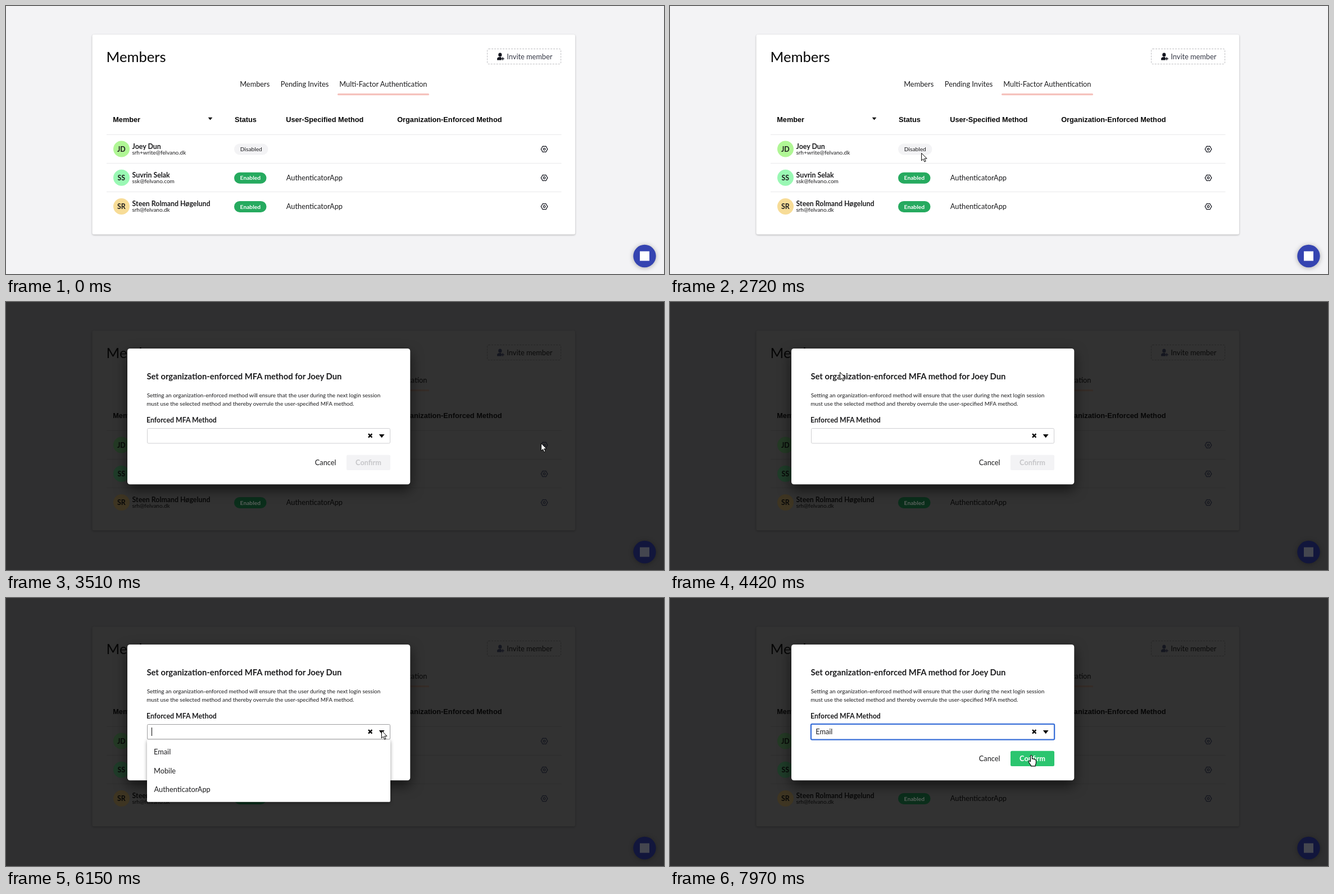
Write an HTML page that moves like this. It is 1171 by 478 pixels and loops after 8000 ms.

```html
<!DOCTYPE html>
<html lang="en">
<head>
<meta charset="utf-8">
<title>Members</title>
<style>
  html, body { margin: 0; width: 100%; height: 100%; overflow: hidden; }
  svg {
    display: block; width: 100%; height: 100%;
    font: 12.8px Lato, sans-serif; fill: #060606;
    --page: #f3f3f5; --card: #fff; --line: #e9e9eb; --dash: #bdbdc0;
    --tab: #f5c1bc; --pill: #26aa5f; --pillText: #fff;
    --a0: #b0f695; --a1: #9af8b4; --a2: #f7dc97;
    --chat: #3544b1; --mark: #fff; --soft: #343745; --ink: #1c1c1e;
  }
  svg.dim {
    --page: #2f2f30; --card: #323232; --line: #2d2d2d; --dash: #262626;
    --tab: #352c27; --pill: #0b2e1b; --pillText: #5c625e;
    --a0: #243a25; --a1: #1f3c29; --a2: #3e3522;
    --chat: #12163c; --mark: #44464f; --soft: #0a0a0a; --ink: #080808;
  }
  text { fill: var(--ink); }
  .title { font-size: 25.6px; fill: #060606; }
  .head { font: bold 12.75px "Liberation Sans", Arial, sans-serif; }
  .head text { fill: #060606; }
  .bold { font-weight: 700; font-size: 12.35px; }
  .small { font-size: 10.02px; }
  .tag { font-size: 10.24px; text-anchor: middle; }
  .mid { text-anchor: middle; }
  .card { fill: var(--card); filter: drop-shadow(0 1px 1.5px rgba(0,0,0,.28)); }
  .row { stroke: var(--line); }
  .modal { filter: drop-shadow(0 9px 11px rgba(0,0,0,.6)); }
  #modal text { --ink: #1c1c1e; }
  .menu { filter: drop-shadow(0 2px 3px rgba(0,0,0,.4)); }
  .gear { fill: none; stroke: #14161f; stroke-width: 1.25; stroke-linejoin: round; }
</style>
</head>
<body>
<svg id="stage" viewBox="0 0 1171 478">
  <rect width="1171" height="478" fill="var(--page)"/>
  <rect class="card" x="153.5" y="51" width="859.5" height="356.5" rx="3"/>
  <text class="title" x="178.6" y="100">Members</text>

  <rect x="856.5" y="76.5" width="131" height="27" rx="2.5" fill="none" stroke="var(--dash)" stroke-dasharray="3 2"/>
  <g fill="#14161f">
    <ellipse cx="879.3" cy="87" rx="3.1" ry="3.6"/>
    <path d="M874 96.5v-2.2q0-2.6 3.6-3.3h3.2l1 1.2v4.3z"/>
    <path d="M881.3 94h5.4M884 91.3v5.4" stroke="#14161f" stroke-width="1.5"/>
  </g>
  <text x="891.3" y="95.4" style="fill:var(--soft)">Invite member</text>

  <text x="416.2" y="144.4">Members</text>
  <text x="488.8" y="144.4">Pending Invites</text>
  <text x="593.3" y="144.4">Multi-Factor Authentication</text>
  <rect x="590" y="156" width="163" height="3.3" rx="1.5" fill="var(--tab)"/>

  <g class="head">
    <text x="190.2" y="206.5">Member</text>
    <text x="406.9" y="206.5">Status</text>
    <text x="498.2" y="206.5">User-Specified Method</text>
    <text x="696.2" y="206.5">Organization-Enforced Method</text>
  </g>
  <path d="M359.7 198.8h7.6l-3.8 4.6z"/>
  <rect id="gearHover" x="944" y="242" width="27" height="26.5" rx="2" fill="#f3f3f5"/>
  <g id="rows"></g>

  <circle cx="1136.5" cy="446" r="20.2" fill="var(--chat)" style="filter:drop-shadow(0 1px 4px rgba(0,0,0,.3))"/>
  <rect x="1128" y="437.5" width="17" height="17" fill="var(--mark)"/>

  <g id="modal">
    <rect class="modal" x="216" y="83" width="503.3" height="242.3" rx="4.5" fill="#fff"/>
    <text class="bold" x="250.4" y="138" style="font-size:14.8px">Set organization-enforced MFA method for Joey Dun</text>
    <g class="small">
      <text x="250.7" y="169.6">Setting an organization-enforced method will ensure that the user during the next login session</text>
      <text x="250.2" y="184.6">must use the selected method and thereby overrule the user-specified MFA method.</text>
    </g>
    <text class="bold" x="250" y="215.4">Enforced MFA Method</text>
    <rect id="field" rx="2" fill="#fff"/>
    <text id="value" x="259.2" y="243.2">Email</text>
    <rect id="caret" y="231" width="1" height="15"/>
    <path d="M645 235.2l6.4 6.4m0-6.4l-6.4 6.4" stroke="#060606" stroke-width="2.4"/>
    <path d="M663.8 236h9.8l-4.9 6.2z"/>
    <text x="549.8" y="291">Cancel</text>
    <rect id="confirm" x="606" y="272.8" width="78" height="27.2" rx="2.5"/>
    <text id="confirmText" class="bold mid" x="645" y="291" style="font-size:12.75px">Confirm</text>
    <g id="menu">
      <rect class="menu" x="251" y="252.8" width="433" height="111" rx="2" fill="#fff"/>
      <rect id="optionHover" x="257" y="258" width="421.5" height="33" rx="2" fill="#f8f8f9"/>
      <text id="option" x="263" y="279.3">Email</text>
      <text x="263" y="313">Mobile</text>
      <text x="263.6" y="346.4">AuthenticatorApp</text>
    </g>
  </g>

  <g id="cursor" stroke="#000" stroke-linejoin="round" fill="#fff">
    <circle id="click" r="10.5" fill="#ffff1a" stroke="none" opacity=".72"/>
    <path id="arrow" d="M.4.6v13.4l3.1-2.9 2.2 5 2.2-1-2.2-4.8h4.3z"/>
    <path id="hand" stroke-width="1.1" d="M-1.6 11.8V2Q-1.6.5-.1.5T1.4 2v5.2q.4-.9 1.6-.7 1 .1 1.1 1.2.5-.7 1.5-.4.9.2 1 1.3 1.5-.6 1.8 1.1v4.4q0 2-1.2 3.6v2.2H-.6v-1.5q-2.5-2.2-4.1-6.1-.5-1.3.5-1.8 1.2-.4 2.6 1.3z"/>
  </g>
</svg>
<script>
const LOOP = 8000, STEP = 50;
const $ = id => document.getElementById(id);
const show = (id, on) => $(id).style.display = on ? "" : "none";
const within = (v, lo, hi) => v >= lo && v < hi;

const members = [
  ["JD", "Joey Dun", "srh+write@felvano.dk", false],
  ["SS", "Suvrin Selak", "ssk@felvano.com", true],
  ["SR", "Steen Rolmand Høgelund", "srh@felvano.dk", true],
];

function gear(x, y) {
  const points = Array.from({ length: 24 }, (_, i) => {
    const a = (i + .5) * Math.PI / 12;
    const r = 5.3 + .5 * Math.cos(6 * a + Math.PI);
    return `${(x + r * Math.sin(a)).toFixed(2)},${(y + r * Math.cos(a)).toFixed(2)}`;
  });
  return `<polygon class="gear" points="${points.join(" ")}"/><circle class="gear" cx="${x}" cy="${y}" r="1.8"/>`;
}

$("rows").innerHTML = members.map(([initials, name, mail, enabled], i) => {
  const y = 255 + 51.2 * i;
  const status = enabled
    ? `<rect x="406" y="${y - 9.5}" width="57.5" height="20" rx="10" fill="var(--pill)"/>
       <text class="tag" font-weight="700" x="434.8" y="${y + 4.1}" style="fill:var(--pillText)">Enabled</text>
       <text x="498.8" y="${y + 4.8}">AuthenticatorApp</text>`
    : `<rect x="406" y="${y - 9.5}" width="60.5" height="20" rx="10" fill="#f3f3f5"/>
       <text class="tag" x="436.3" y="${y + 4.1}">Disabled</text>`;
  return `<path class="row" d="M179 ${Math.round(y - 26) + .5}h809.5"/>
    <circle cx="205.5" cy="${y}" r="14.5" fill="var(--a${i})"/>
    <text class="bold mid" x="205.3" y="${y + 4.6}">${initials}</text>
    <text class="bold" x="224.6" y="${y}">${name}</text>
    <text class="small" x="224.4" y="${y + 10}">${mail}</text>
    ${status}${gear(958, y + .3)}`;
}).join("");

const glide = u => { u = Math.min(1, u * 1.12); return u * u * (3 - 2 * u); };
const brake = u => 1 - (1 - u) ** 1.25;

// start time, step count, from, to, easing, optional bend point
const moves = [
  [1040, 16, [1074, 478], [250, 262], glide],
  [1880, 5, [250, 262], [399, 262], glide],
  [2260, 3, [399, 262], [439, 262], glide],
  [2720, 15, [439, 262], [952, 251.5], glide],
  [3870, 15, [952, 251.5], [283, 127], glide, [600, 88]],
  [4750, 8, [283, 127], [588, 146], glide],
  [5420, 10, [588, 146], [668, 236], brake],
  [6470, 8, [668, 236], [520, 267], glide],
  [7720, 6, [520, 267], [643, 280], glide],
];

function cursorAt(t) {
  const move = moves.filter(m => m[0] <= t).pop();
  if (!move) return null;
  const [start, count, from, to, ease, bend] = move;
  const s = ease(Math.min(1, (Math.floor((t - start) / STEP) + 1) / count));
  return from.map((a, i) => {
    const b = to[i], c = bend ? bend[i] : (a + b) / 2;
    return a * (1 - s) ** 2 + 2 * c * s * (1 - s) + b * s * s;
  });
}

function drawField(focused, active) {
  const grow = focused ? .6 : 0;
  const attrs = {
    x: 251.5 - grow, y: 225.5 - grow, width: 432 + 2 * grow, height: 26.5 + 2 * grow,
    stroke: focused ? "#3b70d8" : active ? "#9c9c9e" : "#cfcfd2",
    "stroke-width": focused ? 2.3 : 1,
  };
  for (const key in attrs) $("field").setAttribute(key, attrs[key]);
}

function draw(t) {
  const pos = cursorAt(t);
  const [x, y] = pos || [-99, -99];
  const dim = t >= 3510, open = within(t, 6150, 7540), chosen = t >= 7540;
  const onOption = open && y > 258;
  const onMail = !dim && within(x, 224, 327) && within(y, 245, 268);
  const hand = onMail || onOption || (chosen && x > 606);

  $("stage").classList.toggle("dim", dim);
  show("modal", dim);
  show("menu", open);
  show("gearHover", !dim && within(x, 943, 972) && within(y, 242, 269));
  show("optionHover", onOption);
  $("option").style.fill = onOption ? "#53389e" : "";

  drawField(chosen, open || (within(y, 225, 253) && within(x, 251, 684)));
  show("value", chosen);
  show("caret", within(t, 6150, 6680) || within(t, 7220, 7750));
  $("caret").setAttribute("x", chosen ? 290 : 259);
  $("confirm").setAttribute("fill", chosen ? "#2bc56f" : "#f3f3f5");
  $("confirmText").style.fill = chosen ? "#fff" : "#c6c6c9";

  show("cursor", pos);
  show("arrow", !hand);
  show("hand", hand);
  show("click", [3460, 6100, 7490].some(c => within(t, c, c + STEP)));
  $("cursor").setAttribute("transform", `translate(${x.toFixed(1)} ${y.toFixed(1)})`);
}

const begin = performance.now();
function tick() {
  draw((performance.now() - begin) % LOOP);
  requestAnimationFrame(tick);
}
tick();
</script>
</body>
</html>
```
